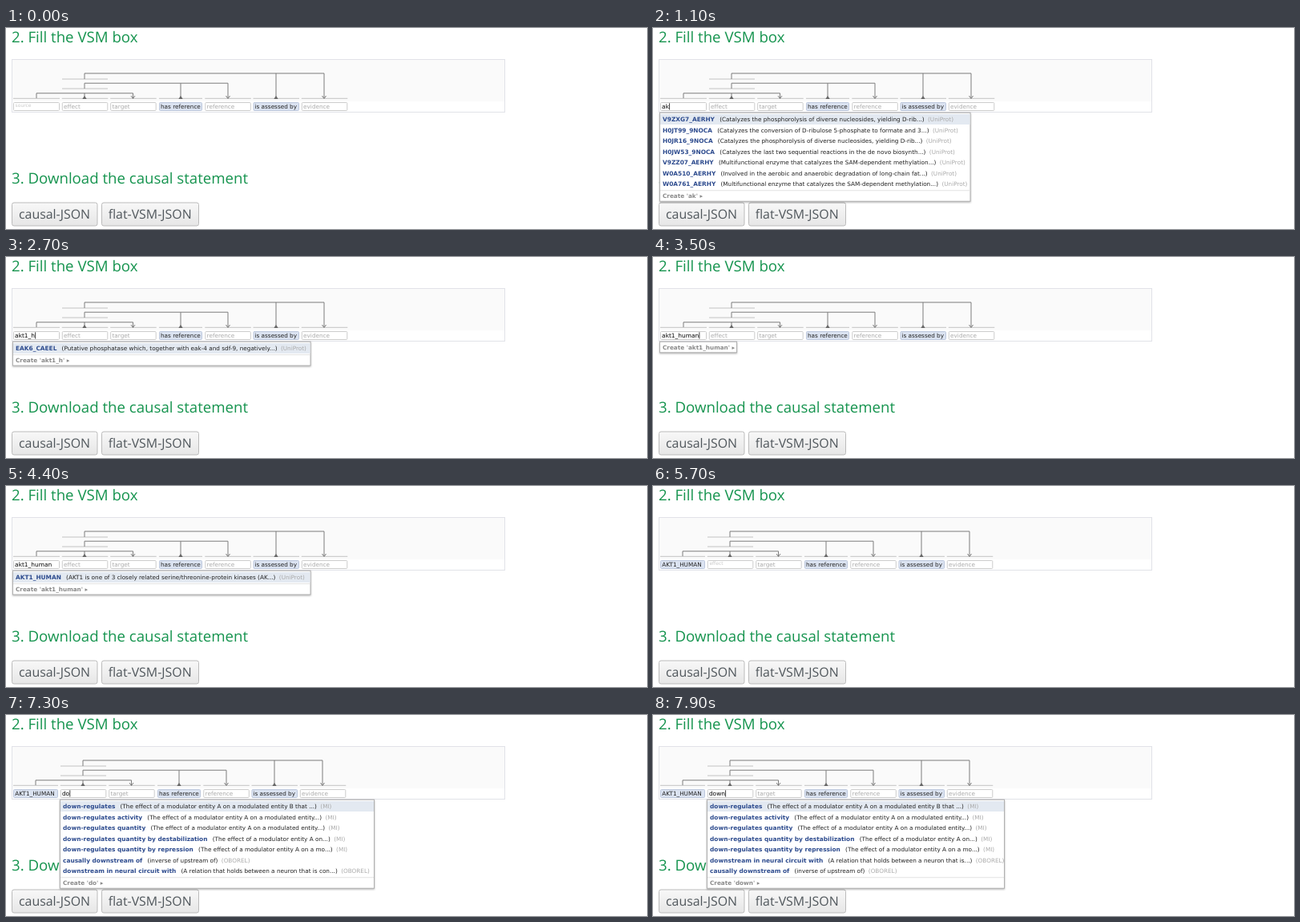
Animation, 800 px wide and 252 px high, one loop 8000 ms. Source, as an HTML page:

```html
<!DOCTYPE html>
<html lang="en">
<head>
<meta charset="utf-8">
<title>Fill the VSM box</title>
<style>
  html, body { margin: 0; width: 100%; height: 100%; overflow: hidden; background: #fff; }
  svg { display: block; width: 800px; height: 252px; }
  text { font: 7.28px "DejaVu Sans", sans-serif; fill: #222; text-rendering: geometricPrecision; white-space: pre; }
  .head { font: 18.65px "Open Sans", sans-serif; fill: #16944f; }
  .btn { font: 15.9px "Open Sans", sans-serif; fill: #50575c; }
  .hint { fill: #aaa; }
  .tiny { font-size: 6px; fill: #c8c8c8; }
  .typed { font-size: 7.45px; fill: #000; }
  .name { font-weight: bold; font-size: 7.42px; fill: #2d4b8e; }
  .src { fill: #aaa; }
  .make { font-weight: bold; fill: #8a8a8a; }
  .wire { fill: none; stroke: #7c7c7c; }
  .rail { stroke: #c2c2c2; }
  .input { fill: #fff; stroke: #ccc; }
  .pill { fill: #dbe3f1; stroke: #bcc7dc; }
  .pop { fill: #fff; stroke: #b0b0b0; filter: drop-shadow(.7px 1.2px 1.1px rgba(0,0,0,.3)); }
</style>
</head>
<body>
<svg viewBox="0 0 800 252">
  <defs>
    <linearGradient id="face" x2="0" y2="1">
      <stop stop-color="#f8f8f8"/><stop offset="1" stop-color="#e6e6e6"/>
    </linearGradient>
  </defs>
  <text class="head" x="7" y="18">2. Fill the VSM box</text>
  <text class="head" x="7" y="195">3. Download the causal statement</text>
  <g fill="url(#face)" stroke="#bbb">
    <rect x="7.5" y="219" width="106.5" height="29" rx="2.5"/>
    <rect x="119.5" y="219" width="121" height="29" rx="2.5"/>
  </g>
  <text class="btn" x="16" y="239">causal-JSON</text>
  <text class="btn" x="127.7" y="239">flat-VSM-JSON</text>
  <rect x="7.5" y="39.5" width="615" height="66" fill="#fff" stroke="#e1e2e8"/>
  <rect x="8" y="40" width="614" height="52" fill="#fafafa"/>
  <g id="box"></g>
  <g id="menu"></g>
</svg>
<script>
const LOOP = 8000;

// A row is "name|description|vocabulary"; the description may be empty.
const uni = s => s + '|UniProt';
const ak = [
  'V9ZXG7_AERHY|Catalyzes the phosphorolysis of diverse nucleosides, yielding D-rib...',
  'H0JT99_9NOCA|Catalyzes the conversion of D-ribulose 5-phosphate to formate and 3...',
  'H0JR16_9NOCA|Catalyzes the phosphorolysis of diverse nucleosides, yielding D-rib...',
  'H0JW53_9NOCA|Catalyzes the last two sequential reactions in the de novo biosynth...',
  'V9ZZ07_AERHY|Multifunctional enzyme that catalyzes the SAM-dependent methylation...',
  'W0A510_AERHY|Involved in the aerobic and anaerobic degradation of long-chain fat...',
  'W0A761_AERHY|Multifunctional enzyme that catalyzes the SAM-dependent methylation...'
].map(uni);
const akt = [
  'AKT1_MOUSE|AKT1 is one of 3 closely related serine/threonine-protein kinases (AK...',
  'AKT1_ARATH|Highly selective inward-rectifying potassium channel that mediate pot...',
  'AKT1_CAEEL|Acts downstream of PI3 kinase age-1 and kinase pdk-1 in the daf-2/ins...',
  'AKTS1_HUMAN|Subunit of mTORC1, which regulates cell growth and survival in respo...',
  'AKT1_XENLA|AKT1 is one of several closely related serine/threonine-protein kinas...',
  'AKT1_HUMAN|AKT1 is one of 3 closely related serine/threonine-protein kinases (AK...',
  'AKT1_RAT|AKT1 is one of 3 closely related serine/threonine-protein kinases (AKT1...'
].map(uni);
const eak = [uni('EAK6_CAEEL|Putative phosphatase which, together with eak-4 and sdf-9, negatively...')];
const d = [
  'database_cross_reference||OBOREL',
  'defined by inverse||OBOREL',
  'definition||OBOREL',
  'definition source||OBOREL',
  'dendrite synapsed in|Relation between a neuron and some structure (e.g.- a brai...|OBOREL',
  'depends on||OBOREL',
  'derived by descent from|d derived_by_descent_from a if d is specified by some ge...|OBOREL'
];
const down = [
  'down-regulates|The effect of a modulator entity A on a modulated entity B that ...|MI',
  'down-regulates activity|The effect of a modulator entity A on a modulated entity...|MI',
  'down-regulates quantity|The effect of a modulator entity A on a modulated entity...|MI',
  'down-regulates quantity by destabilization|The effect of a modulator entity A on...|MI',
  'down-regulates quantity by repression|The effect of a modulator entity A on a mo...|MI',
  'downstream in neural circuit with|A relation that holds between a neuron that is...|OBOREL',
  'causally downstream of|inverse of upstream of|OBOREL'
];
const wide = 'downstream in neural circuit with|A relation that holds between a neuron that is con...|OBOREL';
const pick = (list, order) => [...order].map(i => list[i]);
const doRows = [...pick(down, '012346'), wide];
const dowRows = [...pick(down, '0126'), wide];

// time, active field, typed text, rows (null: no menu), menu width
const steps = [
  [0, 0, '', null],
  [500, 0, 'a', pick(ak, '4102635'), 387.5],
  [1000, 0, 'ak', pick(ak, '4102635'), 387.5],
  [1100, 0, 'ak', ak, 387.5],
  [1300, 0, 'akt', ak, 387.5],
  [1400, 0, 'akt', akt, 379.5],
  [1900, 0, 'akt1', akt, 379.5],
  [2000, 0, 'akt1', pick(akt, '0124563'), 379.5],
  [2500, 0, 'akt1_', pick(akt, '0124563'), 379.5],
  [2700, 0, 'akt1_h', eak, 371.5],
  [2800, 0, 'akt1_h', [], 96],
  [3200, 0, 'akt1_hum', [], 96],
  [3400, 0, 'akt1_huma', [], 96],
  [3500, 0, 'akt1_human', [], 96],
  [3600, 0, 'akt1_human', [akt[5]], 371.5],
  [4400, 0, 'akt1_human', [akt[5]], 371.5, 'still'],
  [5700, 1, '', null],
  [6700, 1, 'd', d, 374.5],
  [7100, 1, 'do', d, 374.5],
  [7300, 1, 'do', doRows, 392],
  [7500, 1, 'dow', dowRows, 392],
  [7700, 1, 'down', dowRows, 392],
  [7800, 1, 'down', down, 371]
];

// label, left, width, fixed term
const fields = [
  ['source', 9, 58], ['effect', 69.8, 57.5], ['target', 130.2, 57.5],
  ['has reference', 191, 54, 1], ['reference', 248.3, 57.5],
  ['is assessed by', 308.5, 57.5, 1], ['evidence', 368.8, 57.5]
];
// bar height, foot of the first leg, then subject, relation and object
const links = [[56.9, 64, 98, 337, 397], [69.2, 76, 98, 218, 277], [81.8, 88, 38, 98, 158.5]];

const box = document.getElementById('box');
const menu = document.getElementById('menu');
const text = (x, y, s, cls = '') => `<text x="${x}" y="${y}" class="${cls}">${s}</text>`;
const rail = (x, y, w) => `<path class="rail" d="M${x} ${y}h${w}"/>`;

function drawLink([top, foot, ...ends], shift) {
  const [a, b, c] = ends.map(x => x < 50 ? x - shift / 2 : x - shift);
  return `<path class="wire" d="M${a} ${foot}V${top}H${c}V88M${b} ${top}V86M${c - 2.5} 85l2.5 3.5 2.5-3.5"/>
    <path fill="#666" d="M${b - 2.7} 89l2.7-4 2.7 4z"/>`;
}

function drawBox(active, typed, still) {
  const shift = active ? 2 : 0;
  let out = rail(70 - shift, 64, 57) + rail(70 - shift, 76, 57);
  fields.forEach(([label, left, width, fixed], i) => {
    const x = i ? left - shift : left;
    const done = i < active;
    const w = done ? 56 : width;
    out += rail(x, 88.3, w) +
      `<rect class="${fixed || done ? 'pill' : 'input'}" x="${x + .5}" y="93.5" width="${w - 1}" height="10" rx="1"/>`;
    if (done) out += text(x + 2.3, 101.2, 'AKT1_HUMAN');
    else if (fixed) out += text(x + 2, 101.2, label);
    else if (i !== active) out += text(x + 2.3, 101.2, label, 'hint');
    else if (!typed) out += text(x + 2.6, 98.8, label, 'tiny');
    else out += text(x + 2.1, 101.1, typed, 'typed');
  });
  box.innerHTML = out + links.map(l => drawLink(l, shift)).join('');
  const line = box.querySelector('.typed');
  if (line && !still) {
    const x = +line.getAttribute('x') + line.getComputedTextLength() + .6;
    box.insertAdjacentHTML('beforeend', `<path stroke="#111" stroke-width=".8" d="M${x} 94.3v8.2"/>`);
  }
}

function drawRow(row, x, y) {
  const [name, about, vocab] = row.split('|');
  return text(x, y, `<tspan class="name">${name}</tspan>` +
    (about ? `<tspan dx="6.2">(${about})</tspan>` : '') +
    `<tspan dx="4.4" class="src">(${vocab})</tspan>`);
}

function drawMenu(active, typed, rows, width) {
  if (!rows) { menu.innerHTML = ''; return; }
  const x = active ? 67.5 : 8.5, top = 106.2, n = rows.length;
  const end = 107.6 + 13.52 * n;
  const mid = n ? end + 8 : 112.8;
  let out = `<rect class="pop" x="${x}" y="${top}" width="${width}" height="${mid + 7 - top}"/>`;
  if (n) {
    out += `<rect x="${x + .5}" y="108" width="${width - 1}" height="13" fill="#e3e9f1"/>` +
      `<path stroke="#e2e2e2" d="M${x + .5} ${end + 1.5}h${width - 1}"/>`;
  }
  rows.forEach((r, i) => out += drawRow(r, x + 3.5, 117.1 + 13.52 * i));
  menu.innerHTML = out + text(x + 3.5, mid + 2.8, `Create '${typed}' ▸`, 'make');
}

let shown = null;
function render(t) {
  const step = steps.findLast(s => s[0] <= t);
  if (step === shown) return;
  shown = step;
  const [, active, typed, rows, width, still] = step;
  drawBox(active, typed, still);
  drawMenu(active, typed, rows, width);
}

const start = performance.now();
function tick() {
  render((performance.now() - start) % LOOP);
  requestAnimationFrame(tick);
}
tick();
</script>
</body>
</html>
```
